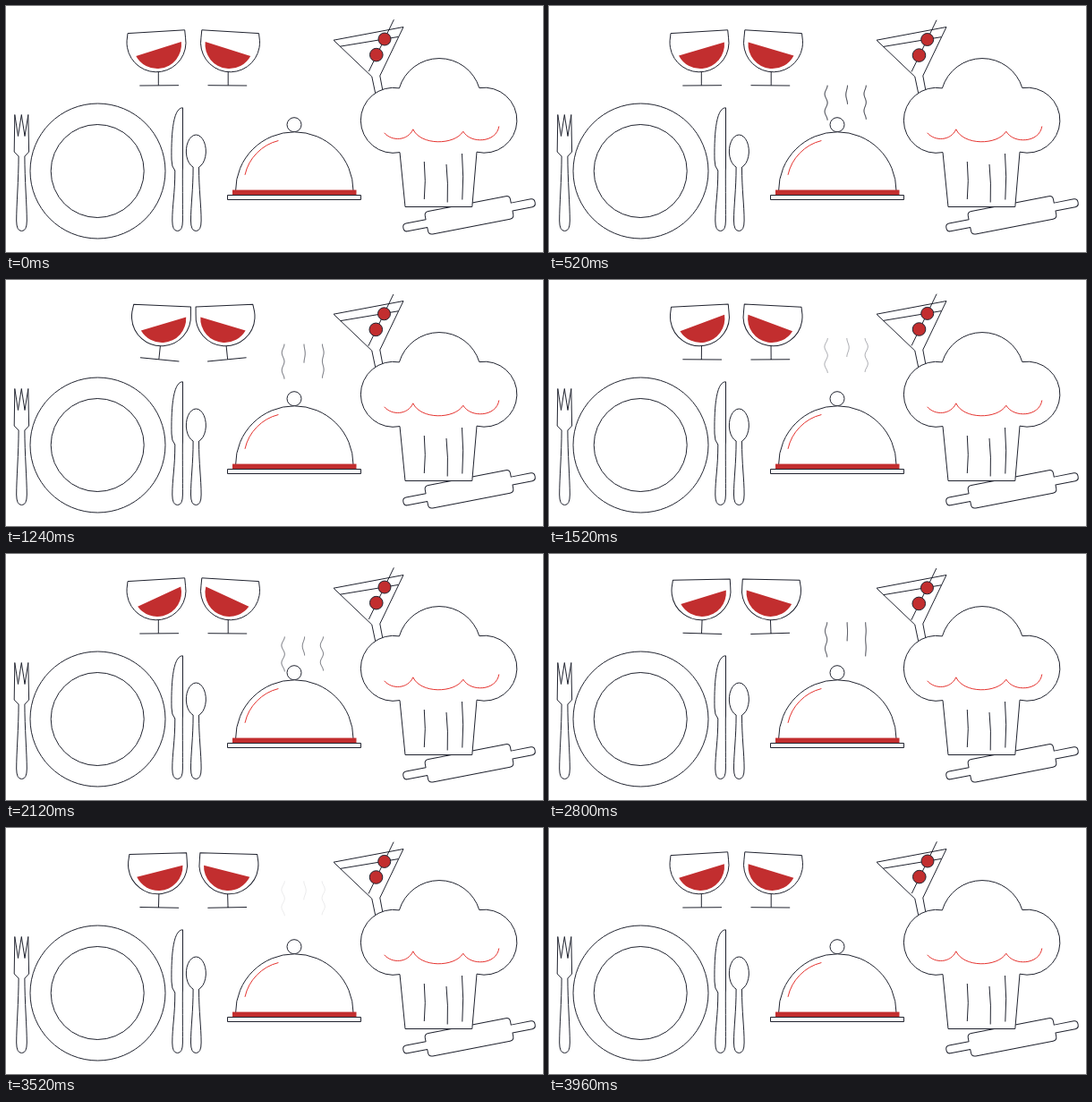
Animation, 600 px wide and 275 px high, one loop 4000 ms. Source, as an HTML page with a canvas:

```html
<!DOCTYPE html>
<html lang="en">
<head>
<meta charset="utf-8">
<title>Kitchen line art</title>
<style>
html, body { margin: 0; width: 100%; height: 100%; overflow: hidden; background: #fff; }
canvas { display: block; width: 600px; height: 275px; }
</style>
</head>
<body>
<canvas id="stage" width="600" height="275"></canvas>
<script>
const ctx = document.getElementById('stage').getContext('2d');
const LOOP = 4000, STEP = 40, TAU = Math.PI * 2, DEG = Math.PI / 180;
const INK = '#20232f', RED = '#c22e2f', BRIGHT = '#e5332f', WHITE = '#fff';

const clamp = (v, lo = 0, hi = 1) => Math.max(lo, Math.min(hi, v));
const smooth = v => { v = clamp(v); return v * v * (3 - 2 * v); };

function draw(path, stroke = INK, fill) {
  if (fill) { ctx.fillStyle = fill; ctx.fill(path); }
  if (stroke) { ctx.strokeStyle = stroke; ctx.stroke(path); }
}

function circle(x, y, r, fill) {
  const p = new Path2D();
  p.arc(x, y, r, 0, TAU);
  draw(p, INK, fill);
}

const svg = (d, stroke, fill) => draw(new Path2D(d), stroke, fill);

// Draws with the origin at (x, y), turned by an angle.
function turned(x, y, angle, paint) {
  ctx.save();
  ctx.translate(x, y);
  ctx.rotate(angle);
  paint();
  ctx.restore();
}

// Cutlery handle, from its right neck around the end to its left neck.
function handle(x, top, left, right = left) {
  const w = 5.8, bend = top + 26;
  return `L${x + right} ${top} C${x + right} ${bend} ${x + w} 222 ${x + w} 240 Q${x + w} 251.5 ${x} 251.5 ` +
    `Q${x - w} 251.5 ${x - w} 240 C${x - w} 222 ${x - left} ${bend} ${x - left} ${top}`;
}

function placeSetting() {
  circle(102.5, 184.5, 75.5);
  circle(102.2, 184.5, 52);
  const tines = 'l3.7 24 l3.8 -24'.repeat(2);
  svg(`M9.8 121.5 ${tines} L25.6 163 ${handle(17.5, 168, 3.4)} L9.2 163 Z`);
  svg(`M197.5 113.8 V181 ${handle(191.6, 184, 2.8, 5.7)} Q185 180 185 172 C184.6 150 185.5 113.5 197.5 113.8 Z`);
  svg(`M209.1 180 A11 18.4 0 1 1 215.6 180 ${handle(212.3, 180, 3.2)}`);
}

function cloche() {
  circle(322, 132.7, 8, WHITE);
  svg('M256.6 206.5 A65.7 65.7 0 0 1 388 206.5', INK, WHITE);
  svg('M267 188.8 A51 51 0 0 1 304.4 150.5', BRIGHT);
  ctx.fillStyle = RED;
  ctx.fillRect(253, 205.6, 138.5, 5.6);
  svg('M247.5 211.5 H396.5 V216.5 H247.5 Z', INK, WHITE);
}

function wisp(x, top, length, waves, swing) {
  const p = new Path2D();
  for (let y = 0; y <= length; y++) {
    p.lineTo(x + swing * Math.cos(y / length * waves * TAU), top + y);
  }
  draw(p);
}

function steam(time) {
  const t = time < 1840 ? time : time - 1760;
  const top = 101 - 0.0237 * t;
  const sway = clamp((t - 940) / 580, -1, 1);
  ctx.save();
  ctx.globalAlpha = Math.min(clamp((t - 100) / 400), clamp((1840 - t) / 880));
  wisp(309.6, top, 39, 2, 1 + 0.7 * Math.abs(sway));
  wisp(333.2 + sway * 0.8, top, 21, 1, -1.2 * sway);
  wisp(353.8 + sway * 0.9, top, 38, 2, -1.6 * sway);
  ctx.restore();
}

function wineGlass(lean, slosh) {
  turned(171, 94, lean * 8.3 * DEG, () => {
    ctx.translate(-171, -94);
    const bowl = new Path2D('M136 30.6 L199.7 26.8');
    bowl.arc(168, 40.8, 33, -0.17, Math.PI + 0.06);
    bowl.closePath();
    draw(bowl);
    svg('M170.3 73.8 V88.8 M149.3 89 L193 88.7');
    const dip = Math.asin((5.2 + 1.4 * lean) / 27);
    const wine = new Path2D();
    wine.arc(169, 43, 27, slosh + dip, slosh + Math.PI - dip);
    draw(wine, null, RED);
  });
}

function toast(t) {
  const s = t < 2100 ? t - 560 : t - 2640;
  const lean = s < 480 ? smooth(s / 480) : smooth((1040 - s) / 560);
  const turn = t / LOOP * TAU;
  const slosh = (-19.7 + 3.3 * Math.cos(turn) - 2 * Math.cos(4 * turn - 1.05)) * DEG;
  wineGlass(lean, slosh);
  ctx.save();
  ctx.translate(418.5, 0);
  ctx.scale(-1, 1);
  wineGlass(lean, slosh);
  ctx.restore();
}

function martini(t) {
  const bob = (1 - Math.cos(t / 2000 * TAU)) / 2;
  svg('M412.8 98 L408.8 79 L366 38.2 L444 23.5 L417.8 78 L421 95');
  svg(`M${373.2 + bob * 0.6} ${45.2 + bob * 0.5} L438.5 ${34.4 + bob * 0.4}`);
  turned(-bob * 0.6, bob * 0.9, 0, () => {
    svg('M433.4 15.2 L405.4 73');
    circle(423, 37, 7, RED);
    circle(413.8, 54.6, 7.3, RED);
  });
}

function rollingPin() {
  turned(517.5, 233.8, -11 * DEG, () => {
    const pin = new Path2D();
    for (const s of [1, -1]) {
      const line = (x, y) => pin.lineTo(x * s, y * s);
      const round = (x, y, x2, y2) => pin.quadraticCurveTo(x * s, y * s, x2 * s, y2 * s);
      line(44, -13);
      round(48.5, -13, 48.5, -8.5);
      line(48.5, -4.5);
      line(71, -4.5);
      round(75, -4.5, 75, 0);
      round(75, 4.5, 71, 4.5);
      line(48.5, 4.5);
      line(48.5, 8.5);
      round(48.5, 13, 44, 13);
    }
    pin.closePath();
    draw(pin, INK, WHITE);
  });
}

function chefHat() {
  svg('M440 163.6 A36.5 36.5 0 1 1 439.4 91.9 A46.7 46.7 0 0 1 528.8 91.6 ' +
      'A36.5 36.5 0 1 1 526 163.2 L520.8 224.5 H446 Z', INK, WHITE);
  svg('M467.3 174 q2 22 0 42 M492 177 q2.2 21 1.2 42.5 M509.5 165 q2.2 26 0.3 51.5');
  svg('M422.7 141.8 C431 151.5 449 151 454.8 137.8 C463 156 501 156 510.8 140.2 ' +
      'C519 154.5 548 153 550.8 134.5', BRIGHT);
}

function render(t) {
  ctx.fillStyle = WHITE;
  ctx.fillRect(0, 0, 600, 275);
  ctx.lineWidth = 1;
  ctx.lineJoin = 'round';
  placeSetting();
  steam(t);
  cloche();
  toast(t);
  martini(t);
  rollingPin();
  chefHat();
}

const start = performance.now();
function tick() {
  const t = (performance.now() - start) % LOOP;
  render(Math.floor(t / STEP) * STEP);
  requestAnimationFrame(tick);
}
tick();
</script>
</body>
</html>
```
